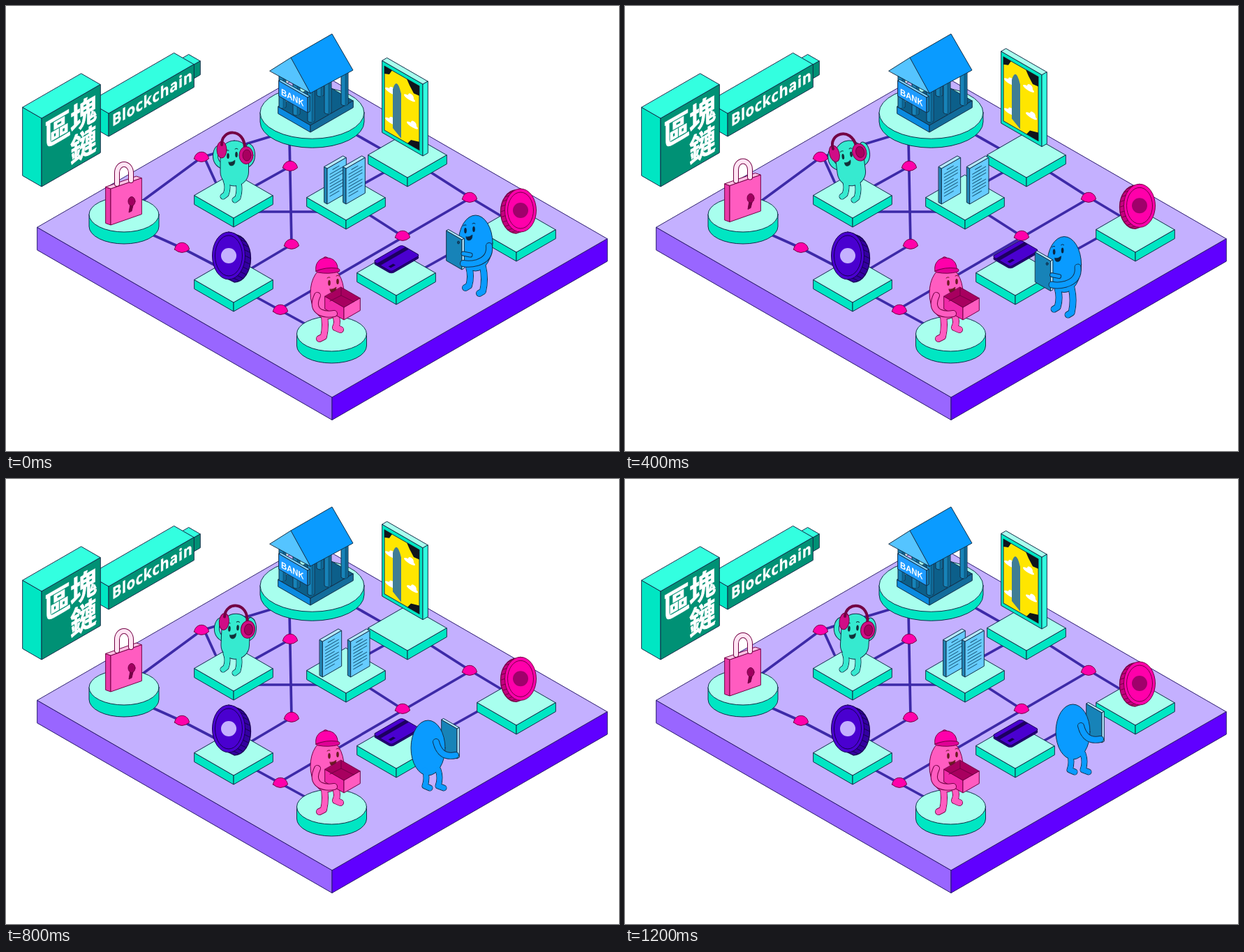
An HTML page for the animation above (1400 ms loop, 878 px wide and 638 px high).

```html
<!DOCTYPE html>
<html lang="zh-Hant">
<head>
<meta charset="utf-8">
<title>Blockchain</title>
<style>
  html, body { margin: 0; width: 100%; height: 100%; overflow: hidden; background: #fff; }
  svg { display: block; width: 100%; height: 100%; }
  text { fill: #fff; stroke: #fff; stroke-width: 0; }
  .sign { font: 800 23px "Noto Sans", "Open Sans", sans-serif; letter-spacing: .7px; stroke-width: .4px; }
  .han { font: 900 44px "Noto Sans CJK TC", "Noto Sans CJK", sans-serif; stroke-width: .8px; }
  .bank { font: 700 13px "Liberation Sans", Arial, sans-serif; }
</style>
</head>
<body>
<svg id="stage" viewBox="0 0 878 638" stroke-linejoin="round" stroke-linecap="round"></svg>
<script>
const INK = '#12304a', MINT = '#a8ffee', TEAL = '#00e6c3', DEEP = '#009175', AQUA = '#33ffe0';
const PINK = '#ff5cc0', HOT = '#ff00aa', WINE = '#730044', BLUE = '#0a9bff', STEEL = '#1783b8';
const INDIGO = '#4a00d0', NIGHT = '#160050', SKY = '#b5e8ff', SKIN = '#36ead0';
const ISO = .577;

// Drawing helpers
const poly = (pts, fill, ink = INK) => `<polygon points="${pts}" fill="${fill}" stroke="${ink}"/>`;
const path = (d, fill = 'none', ink = INK, w = 1) =>
  `<path d="${d}" fill="${fill}" stroke="${ink}" stroke-width="${w}"/>`;
const oval = (x, y, rx, ry, fill, ink = INK) =>
  `<ellipse cx="${x}" cy="${y}" rx="${rx}" ry="${ry}" fill="${fill}" stroke="${ink}"/>`;
const rect = (x, y, w, h, fill, r = 0, ink = 'none') =>
  `<rect x="${x}" y="${y}" width="${w}" height="${h}" rx="${r}" fill="${fill}" stroke="${ink}"/>`;
const tube = (d, w, fill, ink = INK) => path(d, 'none', ink, w + 2) + path(d, 'none', fill, w);
const group = (id, body) => `<g id="${id}">${body}</g>`;
const slant = (a, b, c, d, x, y, body) => `<g transform="matrix(${a} ${b} ${c} ${d} ${x} ${y})">${body}</g>`;
const words = (cls, x, y, slope, text) => slant(.87, slope, 0, 1, x, y, `<text class="${cls}">${text}</text>`);
const repeat = (n, f) => Array.from({ length: n }, (_, k) => f(k)).join('');

// Isometric block: (x, y) is its front top corner, l and r reach left and right, h goes down
function box(x, y, l, r, h, [top, left, right], ink = INK, k = ISO) {
  const a = [x - l, y - l * k], b = [x + r, y - r * k];
  return poly([a, x, y, x, y + h, a[0], a[1] + h], left, ink) +
    poly([b, x, y, x, y + h, b[0], b[1] + h], right, ink) +
    poly([a, x, y, b, x + r - l, y - (l + r) * k], top, ink);
}

const tile = (x, y) => box(x, y + 32, 56, 56, 13, [MINT, TEAL, TEAL]);

const disc = (x, y, rx, d) => {
  const ry = rx / 2;
  return path(`M${x - rx} ${y}v${d}a${rx} ${ry} 0 0 0 ${2 * rx} 0v${-d}z`, TEAL) + oval(x, y, rx, ry, MINT);
};

const node = ([x, y]) => path(`M${x - 10.5} ${y + 2}c2 -13 19 -13 21 0q-10.500 9 -21 0z`, HOT, WINE);

// A thick coin; dx < 0 shows its rim on the left
function coin(x, y, rx, ry, dx, dy, face, rim, ink, mark) {
  const side = Math.sign(dx);
  return path(`M${x} ${y - ry}l${dx} ${dy}a${rx} ${ry} 0 0 ${side > 0 ? 1 : 0} 0 ${2 * ry}L${x} ${y + ry}z`, rim, ink, 1.3) +
    repeat(11, k => {
      const a = (k - 5) * .25;
      return path(`M${x + side * rx * Math.cos(a)} ${y + ry * Math.sin(a)}l${dx} ${dy}`, 'none', ink);
    }) +
    oval(x, y, rx, ry, face, ink) + oval(x, y, rx - 4, ry - 5, face, ink) + oval(x, y, 11, 11, mark, 'none');
}

// Two legs lie behind the body, then blend into it
function figure(legs, w, body, skin, ink) {
  return legs.map(d => tube(d, w, skin, ink)).join('') + body + legs.map(d => path(d, 'none', skin, w)).join('');
}
const leg = (x, y, h, toe) => `M${x} ${y}q4 ${h / 2} 0 ${h}l${toe} 3`;

const face = (x, y, ink) =>
  oval(x, y, 1.8, 4, ink, 'none') + oval(x + 12, y - 2, 1.8, 4, ink, 'none') +
  path(`M${x + 1} ${y + 9}q5 1 9 -3q0 8 -5 8q-4 0 -4 -5z`, ink, ink, .6) +
  path(`M${x - 3} ${y - 7}q2 -2 4 -1m9 -2q2 -2 4 0`, 'none', ink);

function board() {
  const wires = ['196 279 280 217 386 185', '284 217 300 252', '346 264 407 230', '406 190 409 342 345 380',
    '354 295 455 295', '203 325 252 347 300 372', '354 415 440 462', '393 434 664 276',
    '515 296 568 330', '497 182 541 207', '548 235 512 255', '603 235 664 274 714 304', '597 377 683 329'];
  const nodes = [[280, 217], [407, 230], [409, 342], [252, 347], [393, 436], [568, 330], [664, 275]];
  return box(467, 561, 422, 394, 32.5, ['#c4b0ff', '#9966ff', '#6000ff'], '#2a1a70') +
    wires.map(w => path('M' + w, 'none', '#3d2aa8', 3.7)).join('') + nodes.map(node).join('');
}

function titleBlocks() {
  const tones = [AQUA, TEAL, DEEP];
  return box(269, 84, 16, 9, 20, tones) + box(147, 154, 28, 122, 33, tones) + box(51, 161, 27, 84, 98, tones) +
    words('sign', 152, 173, -.5, 'Blockchain') +
    words('han', 55, 204, -.5, '區') + words('han', 92, 182, -.5, '塊') + words('han', 92, 226, -.5, '鏈');
}

function bank() {
  const column = (x, foot) =>
    path(`M${x - 5} ${foot - 48}v48q5 4 10 0v-48z`, STEEL) + path(`M${x + 2} ${foot - 46}v47`, 'none', '#0c5f8a', 3);
  return disc(438.5, 153, 74.5, 13) +
    box(436, 171, 46, 61, 10, ['#0c5f8a', '#0a8ae0', '#126c9c']) +
    column(450, 128) + repeat(2, k => column(396 + 20 * k, 145 + 10 * k)) +
    repeat(3, k => column(485 - 24 * k, 141 + 12 * k)) +
    poly('408,74 467,40 497,92 436,125', BLUE) +
    poly('378,93 408,74 436,125', '#55c4ff') +
    box(432, 131, 41, 3, 22, ['#7fd2ff', '#1e9bff', STEEL]) +
    words('bank', 394, 127, .46, 'BANK');
}

function picture() {
  const cloud = (x, y) => oval(x, y, 8, 3, '#fff', 'none') + oval(x + 2, y - 3, 4, 4, '#fff', 'none');
  const art = rect(0, 0, 50, 92, '#ffe600', 0, INK) +
    path('M0 0h11l-4 8l-7 3zM50 0v14l-8 1l-6 -8l-4 -7zM50 92h-17l5 -8l12 -4z', '#10141c', 'none') +
    cloud(9, 31) + cloud(36, 25) + cloud(40, 62) + cloud(9, 74) +
    path('M12 82V26q6 -22 12 0V90z', '#3f7d94', 'none');
  return box(597, 112, 58, 7, 103, [MINT, TEAL, AQUA]) + slant(1, ISO, 0, 1, 542, 86, art);
}

function sheet(x) {
  const lines = repeat(9, k => path(`M${k ? 4 : 8} ${6 + k * 4.5}H${k % 4 ? 23 : 17}`, 'none', '#14506e', 1.1));
  return box(x + 4, 233, 4, 27, 51, [SKY, '#2388b8', '#66ccff']) + slant(1, -ISO, 0, 1, x + 4, 233, lines);
}

function padlock() {
  return box(150, 262, 7, 44, 52, ['#ffc0e4', '#e83aa8', PINK], WINE, .35) +
    tube('M159 255V239a10 12 0 0 1 20 0v11', 6, '#ffe4f3', WINE) +
    path('M178 284l-2 12l4 -2l3 -12z', WINE, WINE) + oval(180, 280, 5, 6.5, '#a0005f', WINE);
}

function card() {
  const plate = (y, body) => slant(.866, -.5, .866, .5, 526, y, body);
  return plate(369, rect(0, 0, 47, 30, '#24007a', 4, NIGHT)) +
    plate(366, rect(0, 0, 47, 30, INDIGO, 4, NIGHT) + rect(0, 6, 47, 6, '#1d0060') + rect(5, 20, 8, 4, NIGHT));
}

function courier() {
  return figure([leg(455, 440, 34, -6), leg(472, 444, 17, 7)], 8, oval(460, 411.5, 24, 37.5, PINK, WINE), PINK, WINE) +
    face(463, 397, '#6b1a22') +
    path('M453 363q4 -7 10 0z', HOT, WINE) +
    path('M444 380c-2 -11 5 -19 15 -19c11 0 17 8 16 18q-16 -5 -31 1z', HOT, WINE) +
    path('M444 380q14 -6 30 -4q6 1 3 5q-15 4 -30 1z', '#e00096', WINE) +
    box(484, 432, 27, 23, 18, ['#a8005f', '#f02aa8', PINK], WINE) +
    path('M480 404v11l-16 8m16 -8l18 9', 'none', WINE) +
    tube('M446 415q-8 17 4 24q8 4 20 2', 8, PINK, WINE);
}

function listener() {
  const cup = (x, y, rx, ry) => oval(x, y, rx, ry, '#d00d86', WINE);
  const arms = tube('M312 231q-13 -5 -12 -18q1 -8 5 -10', 6, SKIN) + tube('M343 229q11 -4 10 -18q-1 -8 -5 -10', 6, SKIN);
  const phones = cup(309, 206, 7, 12) +
    path('M309 199c-1 -23 33 -25 33 5', 'none', WINE, 4) +
    cup(344, 214, 10, 12.5) + oval(345, 214, 6, 8, '#a8005f', WINE);
  const body = group('sway', arms + rect(307, 193, 40.5, 65, SKIN, 20, INK) + face(318, 215, '#123038') + group('phones', phones));
  return figure([leg(315, 250, 20, -4), leg(332, 250, 25, -4)], 7, body, SKIN);
}

const phone = (x, y) => box(x, y, 22, 3, 43, [SKY, STEEL, SKY]);

function walkerFront() {
  return figure([leg(663, 374, 27, -5), leg(683, 374, 35, -5)], 8, oval(672.5, 340, 24.500, 40, BLUE), BLUE) +
    face(658, 322, '#0a2440') + phone(653, 335) + oval(648, 339, 1.5, 2, '#0c4f78') +
    tube('M692 344q2 18 -17 24q-11 3 -20 1', 8, BLUE) + tube('M665 357l-10 -2', 5, BLUE);
}

function walkerBack() {
  return tube('M622 388l20 8', 7, BLUE) + phone(646, 358) +
    figure([leg(600, 417, 23, 7), leg(619, 417, 23, 8)], 7, oval(604.5, 385.5, 24.5, 39.5, BLUE), BLUE) +
    tube('M616 377q6 24 28 19', 8, BLUE);
}

const stage = document.getElementById('stage');
stage.innerHTML = board() + titleBlocks() + bank() +
  tile(575, 214) + group('picture', picture()) +
  tile(326, 272) + listener() +
  tile(487, 275) + group('sheetL', sheet(456)) + group('sheetR', sheet(483)) +
  disc(169, 299, 50, 17) + group('padlock', padlock()) +
  tile(731, 321) + group('coin', coin(737, 293, 22.5, 31, -6, 2, HOT, '#c4007f', WINE, '#a0006b')) +
  tile(326, 393) + coin(319, 358, 23.5, 34, 8, 4, INDIGO, '#3300a0', NIGHT, '#c4b0ff') +
  tile(559, 383) + group('card', card()) +
  disc(466.5, 470, 50, 17) + courier() +
  group('front', walkerFront()) + group('back', walkerBack());

const parts = Object.fromEntries([...stage.querySelectorAll('g[id]')].map(g => [g.id, g]));
const move = (id, x, y) => parts[id].setAttribute('transform', `translate(${x} ${y})`);
const turn = (id, a, x, y) => parts[id].setAttribute('transform', `rotate(${a} ${x} ${y})`);
const show = (id, on) => parts[id].setAttribute('display', on ? 'inline' : 'none');

const STEP = 200, COUNT = 7, TURN = 4;

// Straight swing: 0 at the start, lo at step a, hi at step b, 0 at the end
function swing(i, a, lo, b, hi) {
  if (i < a) return lo * i / a;
  if (i < b) return lo + (hi - lo) * (i - a) / (b - a);
  return hi * (COUNT - i) / (COUNT - b);
}

function draw(time) {
  const i = Math.floor(time / STEP) % COUNT;
  const swell = 1 - Math.abs(i - 3) / 3;
  const lean = swing(i, 2, -1, 5, 1);
  move('picture', 0, -20 * swell);
  move('sheetL', -10 * swell, 0);
  move('sheetR', 10 * swell, 0);
  move('coin', 0, -10 * swell);
  move('padlock', 0, swing(i, 4, -9, COUNT, 0));
  move('card', 0, swing(i, 2, -7, 5, 3.5));
  turn('sway', 7 * lean, 324, 262);
  turn('phones', 9 * lean, 327, 225);
  move('front', -21.7 * i, 15.3 * i);
  move('back', 18.5 * (i - TURN), -11.5 * (i - TURN));
  show('front', i < TURN);
  show('back', i >= TURN);
}

const start = performance.now();
function tick() {
  draw(performance.now() - start);
  requestAnimationFrame(tick);
}
tick();
</script>
</body>
</html>
```
